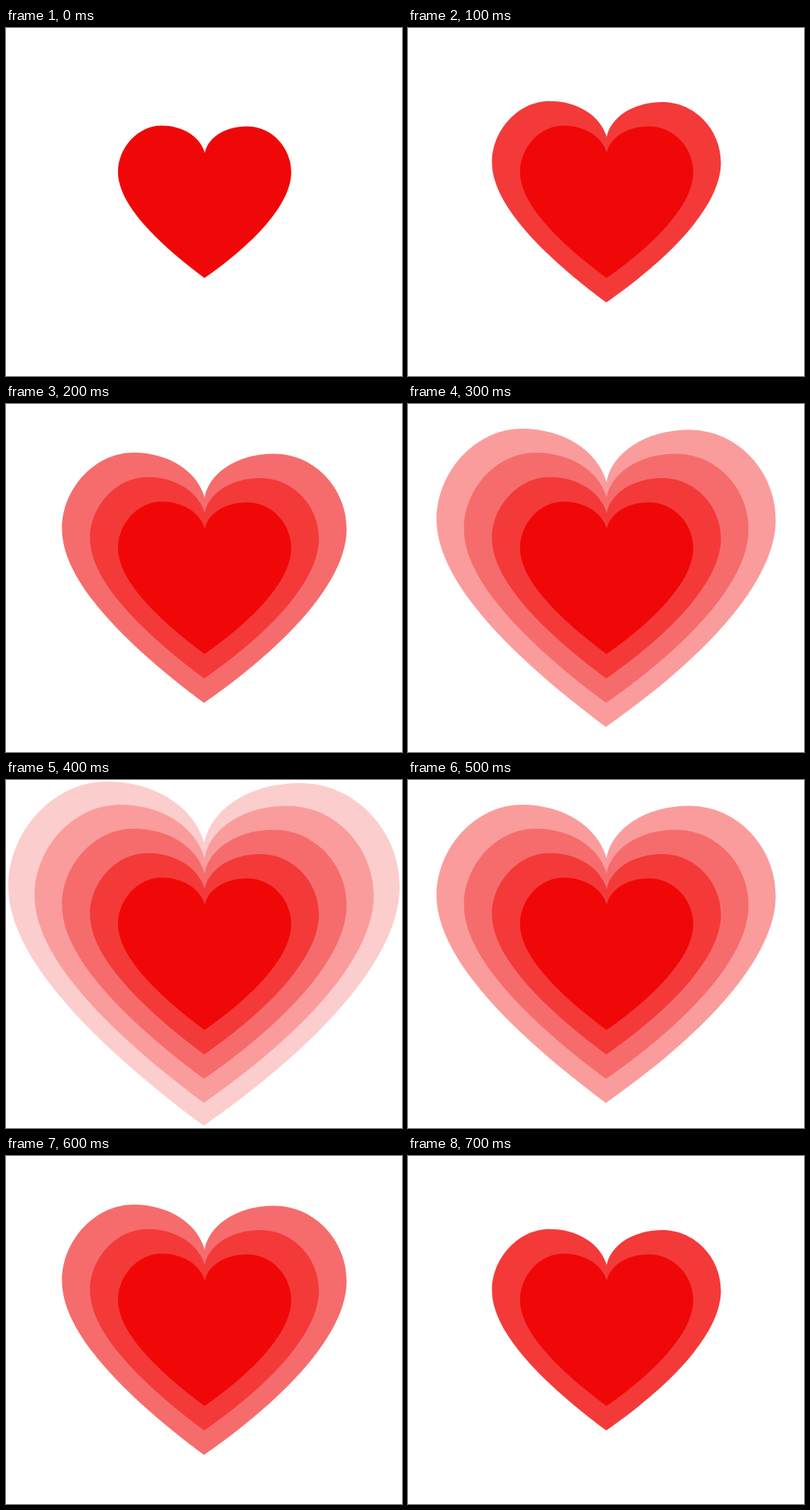
These frames come from a looping animation (512x451 px, 800 ms). An HTML page:

```html
<!DOCTYPE html>
<html lang="en">
<head>
<meta charset="utf-8">
<title>Beating heart</title>
<style>
  html, body { margin: 0; width: 100%; height: 100%; overflow: hidden; background: #fff; }
  svg { display: block; width: 100%; height: 100%; }
</style>
</head>
<body>
<svg id="stage" viewBox="0 0 512 451"></svg>
<script>
  // Heart outline with its tip near the origin, 506 units wide
  const OUTLINE = 'M-253-310C-253-381-195-446-126-446C-62-446-12-412 .5-366' +
    'C8-408 56-444 124-444C196-444 253-382 253-310C253-214 140-98-.5 0' +
    'C-132-98-253-214-253-310Z';
  const WIDTHS = [224, 296, 368, 438.5, 506];
  const COLORS = ['#f00808', '#f43939', '#f66c6c', '#fa9c9c', '#fccdcd'];
  const STEP = 100;
  const LOOP = 800;

  const stage = document.getElementById('stage');
  const hearts = WIDTHS.map((w, i) => {
    const heart = document.createElementNS(stage.namespaceURI, 'path');
    const x = 256.8 - i / 5;
    const y = 324 + (w - WIDTHS[0]) * 0.44;
    heart.setAttribute('d', OUTLINE);
    heart.setAttribute('fill', COLORS[i]);
    heart.setAttribute('transform', `translate(${x} ${y}) scale(${w / 506})`);
    stage.prepend(heart);
    return heart;
  });

  // One ring appears per step up to the largest, then they vanish again
  function draw(now) {
    const step = Math.floor((now % LOOP) / STEP);
    const outer = 4 - Math.abs(4 - step);
    hearts.forEach((heart, i) => {
      heart.style.display = i <= outer ? '' : 'none';
    });
  }

  let start;
  function tick(now) {
    start ??= now;
    draw(now - start);
    requestAnimationFrame(tick);
  }
  draw(0);
  requestAnimationFrame(tick);
</script>
</body>
</html>
```
